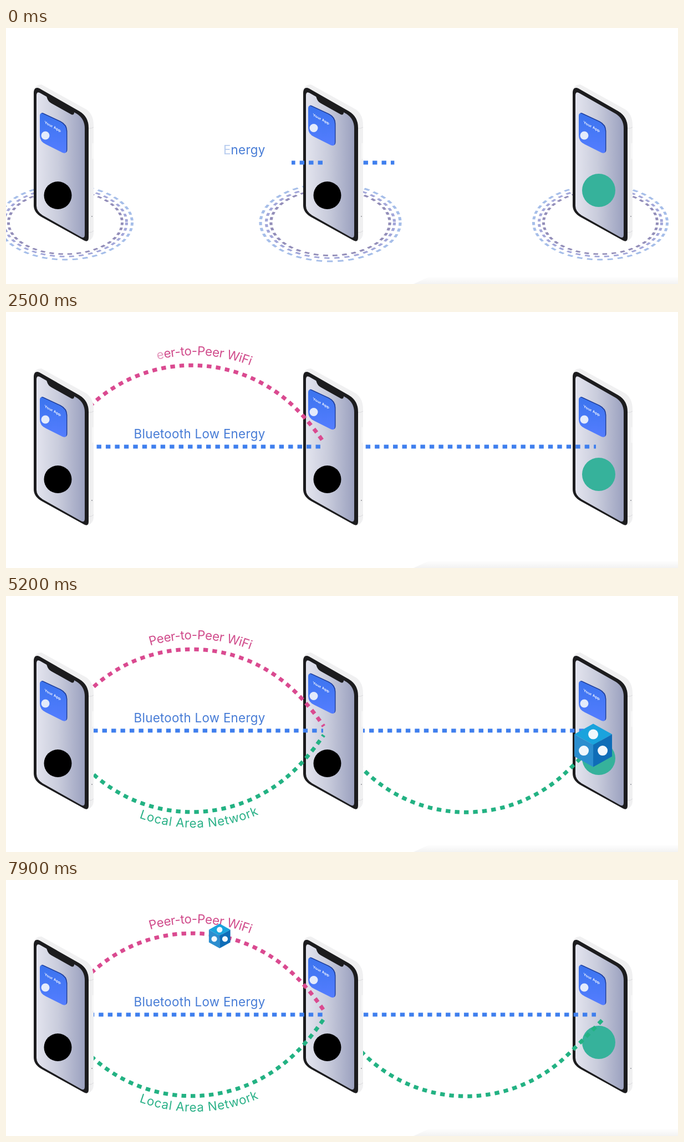
An HTML page for the animation above (8 s loop, 1212x462 px).

```html
<!DOCTYPE html>
<html lang="en">
<head>
<meta charset="utf-8">
<title>Device mesh</title>
<style>
  html, body { margin: 0; width: 100%; height: 100%; overflow: hidden; background: #fff; }
  svg { display: block; width: 100%; height: 100%; overflow: hidden; }
  .label { font: 22.4px Inter, sans-serif; white-space: pre; }
  .app { font: 600 6.6px Inter, sans-serif; fill: #fff; }
</style>
</head>
<body>
<svg id="stage" viewBox="0 0 1212 462">
  <defs>
    <linearGradient id="glass">
      <stop offset="0" stop-color="#e3e4ee"/>
      <stop offset=".45" stop-color="#c9ccdc"/>
      <stop offset="1" stop-color="#9ba1bf"/>
    </linearGradient>
    <linearGradient id="tile" x2="0" y2="1">
      <stop offset="0" stop-color="#3b74ee"/>
      <stop offset="1" stop-color="#547dff"/>
    </linearGradient>
    <linearGradient id="floor" x2="0" y2="1">
      <stop offset="0" stop-color="#000" stop-opacity="0"/>
      <stop offset="1" stop-color="#000" stop-opacity=".05"/>
    </linearGradient>
    <path id="pinkArc" d="M260 89.600A283 283 0 0 1 460 104.700"/>
    <path id="greenArc" d="M240 400.400A293 293 0 0 0 470 387.600"/>
  </defs>
  <path d="M735 462L765 448H1212V462Z" fill="url(#floor)"/>
</svg>
<script>
const LOOP = 8000;
const DASH = 8.4, PITCH = 16.46, SPEED = 0.0708;
const BLUE = '#3f7fee', PINK = '#da4a90', GREEN = '#23b283';
const stage = document.getElementById('stage');

function add(tag, attrs, parent = stage) {
  const el = document.createElementNS('http://www.w3.org/2000/svg', tag);
  for (const key in attrs) el.setAttribute(key, attrs[key]);
  parent.append(el);
  return el;
}

const clamp = (v, lo = 0, hi = 1) => Math.min(hi, Math.max(lo, v));
const progress = (t, start, span) => clamp((t - start) / span);
const mod = (a, n) => ((a % n) + n) % n;
const mix = (a, b, p) => a + (b - a) * p;
const easeInOut = p => p * p * (3 - 2 * p);
const easeOut = p => 1 - (1 - p) ** 3;

// Piecewise linear value from [time, value] steps
function track(steps, t) {
  let [t0, v0] = steps[0];
  for (const [t1, v1] of steps) {
    if (t < t1) return t1 === t0 ? v0 : mix(v0, v1, progress(t, t0, t1 - t0));
    [t0, v0] = [t1, v1];
  }
  return v0;
}

// Circles seen at an angle, so strokes and dashes flatten too
function makeRing(x, size) {
  const g = add('g', {});
  const bands = [[120.5, '#a6bee9', '10 8.5'], [110.5, '#a3a7d9', '9 8.5'], [102.5, '#938eb9', '8.5 8']];
  for (const [r, stroke, dash] of bands)
    add('circle', { r, stroke, 'stroke-width': 5, 'stroke-dasharray': dash, fill: 'none' }, g);
  return { g, x, size };
}

function drawRing({ g, x, size }, t) {
  const p = progress(t, 0, 1450);
  const k = size + 0.2 * p;
  g.setAttribute('transform', `translate(${x} 351) scale(${k} ${k * 0.556})`);
  g.setAttribute('opacity', 1 - p);
}

function makePhone(x, notch, iconX, iconY, badge) {
  const g = add('g', { transform: `translate(${x} 0)` });
  const shape = (d, fill) => add('path', { d, fill }, g);
  const line = (d, stroke, width) => add('path', { d, stroke, 'stroke-width': width, fill: 'none' }, g);
  shape('M0 114Q2 102 14 102L95 147Q108 156 108 176V370Q108 380 98 385L40 340Z', '#f0f0f1');
  line('M99 181Q104 182 108 179M99 369Q104 370 108 366', '#d9d9dc', 1);
  line('M106.500 208V236', '#fafafa', 2);
  add('circle', { cx: 105, cy: 340, r: 1, fill: '#8f9096' }, g);
  shape('M0 118C0 108 5 106 12 110L82 150Q99 160 99 180V378Q99 388 90 383L14 341Q0 333 0 320Z', '#1c1c1e');
  shape('M5 122Q5 114 11 117L78 155Q92 164 92 181V373Q92 381 85 377L16 338Q5 331 5 321Z', 'url(#glass)');
  if (notch) shape('M22 120L24 126Q26 133 32 136L66 155Q72 159 73 153V149Z', '#1c1c1e');

  const icon = add('g', { transform: `translate(${iconX} ${iconY})` }, g);
  const face = 'M11 159Q11 152 17 155L47 169Q59 175 59 187V220Q59 228 52 225L22 210Q11 205 11 194Z';
  add('path', { d: face, fill: '#1f3f9c', transform: 'translate(1.500 -1)' }, icon);
  add('path', { d: face, fill: 'url(#tile)' }, icon);
  add('text', { class: 'app', transform: 'matrix(1 .55 0 1 19.500 172)' }, icon).textContent = 'Your App';
  add('circle', { cx: 21, cy: 194, r: 7.5, fill: '#e4ebfb' }, icon);

  const [cx, cy, r, fill] = badge;
  add('circle', { cx, cy, r, fill }, g);
}

// Dashes run towards the path's start while the link grows away from it
function makeLink(d, stroke, start, fromEnd) {
  const path = add('path', { d, stroke, 'stroke-width': 7, fill: 'none' });
  const length = path.getTotalLength();
  const shift = fromEnd === undefined ? 0 : DASH - length + fromEnd;
  return { path, length, start, shift };
}

function drawLink({ path, length, start, shift }, t) {
  const shown = length * easeInOut(progress(t, start, 850));
  const list = [0];
  let last = 0;
  for (let s = -mod(SPEED * (t - 4200) + shift, PITCH); s < shown; s += PITCH) {
    const a = Math.max(s, 0), b = Math.min(s + DASH, shown);
    if (b <= a) continue;
    list.push(a - last, b - a);
    last = b;
  }
  list.push(9999);
  path.setAttribute('stroke-dasharray', list.join(' '));
  path.setAttribute('visibility', list.length > 2 ? 'visible' : 'hidden');
}

// Letters fade in one by one, last letter first
function makeLabel(text, fill, start, attrs, arc) {
  const el = add('text', { class: 'label', fill, ...attrs });
  const box = arc ? add('textPath', { href: arc }, el) : el;
  const letters = [...text].map(ch => {
    const span = add('tspan', {}, box);
    span.textContent = ch;
    return span;
  });
  return { letters: letters.reverse(), start };
}

function drawLabel({ letters, start }, t) {
  letters.forEach((el, i) => el.setAttribute('fill-opacity', progress(t, start + i * 50, 55)));
}

function makeCube() {
  const g = add('g', {});
  const faces = [
    ['M0-39L34-20L0-1L-34-20Z', '#1aa3dd', 0, -20],
    ['M-34-20L0-1V39L-34 20Z', '#2c8ecf', -17, 9.5],
    ['M34-20L0-1V39L34 20Z', '#0f6db7', 17, 9.5]
  ];
  for (const [d, fill, cx, cy] of faces) {
    add('path', { d, fill }, g);
    add('circle', { cx, cy, r: 9, fill: '#f2f8fd' }, g);
  }
  return g;
}

const rings = [makeRing(107, 1), makeRing(585, 1.045), makeRing(1072, 1)];
const apple = [43.5, 302, 25, '#000'];

makePhone(1022, false, 0, 0, [47, 293, 30, '#36b29b']);
const relay = makeLink('M600 254A262 262 0 0 0 1005 323Q1040 290 1075 253', GREEN, 3350, 1.7);
const links = [relay, makeLink('M643.600 243H1064', BLUE, -195)];

makePhone(536, true, -2, -13.5, apple);
const wifi = makeLink('M573 235Q540 187 505 158A265 265 0 0 0 107 226', PINK, 1590);
links.push(
  wifi,
  makeLink('M572 243H150', BLUE, -195),
  makeLink('M573 251Q540 299 505 328A265 265 0 0 1 107 260', GREEN, 3350)
);

makePhone(50, true, 0, 0, apple);
const labels = [
  makeLabel('Bluetooth Low Energy', '#477cd6', -270, { x: 230.5, y: 228, 'letter-spacing': 0.27 }),
  makeLabel('Peer-to-Peer WiFi', '#d04b8b', 1720, { 'letter-spacing': -0.4 }, '#pinkArc'),
  makeLabel('Local Area Network', '#2bb188', 3380, { 'letter-spacing': 0.7 }, '#greenArc')
];
const cube = makeCube();

const cubeSize = [[5230, 1], [5560, 0.54], [6400, 0.51], [6650, 0.52], [7050, 0.9], [7140, 0.9], [7500, 0.57]];

function drawCube(t) {
  const first = easeInOut(progress(t, 5350, 1700));
  const second = easeInOut(progress(t, 7140, 1700));
  let { x, y } = relay.path.getPointAtLength((relay.length - 23) * (1 - first));
  if (t > 7050) {
    const on = wifi.path.getPointAtLength(wifi.length * second);
    const p = progress(t, 7050, 90);
    x = mix(x, on.x, p);
    y = mix(y, on.y, p);
  }
  const size = easeOut(progress(t, 4650, 400)) * track(cubeSize, t);
  cube.setAttribute('transform', `translate(${x} ${y}) scale(${size})`);
  cube.setAttribute('visibility', size > 0 ? 'visible' : 'hidden');
}

function render(t) {
  rings.forEach(r => drawRing(r, t));
  links.forEach(l => drawLink(l, t));
  labels.forEach(l => drawLabel(l, t));
  drawCube(t);
}

const began = performance.now();
function tick() {
  render((performance.now() - began) % LOOP);
  requestAnimationFrame(tick);
}
render(0);
requestAnimationFrame(tick);
</script>
</body>
</html>
```
